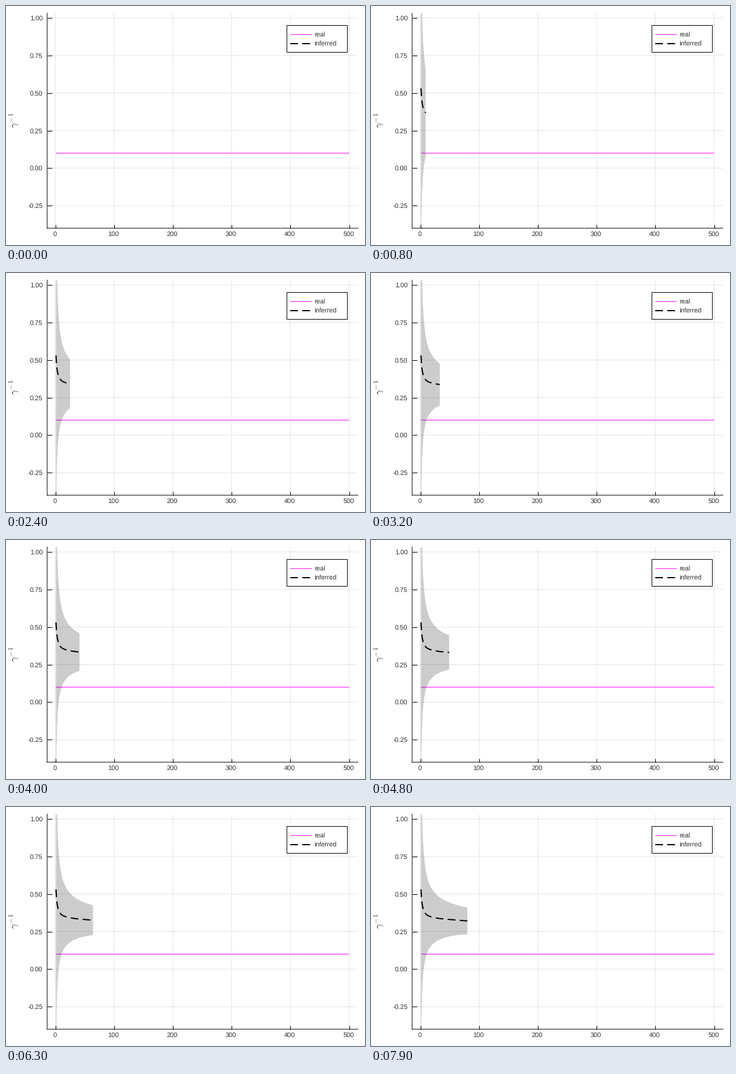
Recreate the animation shown at these times as a matplotlib script. Size 600 by 400 pixels, loop 8 s.

```python
import numpy as np
import matplotlib.pyplot as plt
from matplotlib.animation import FuncAnimation
from matplotlib.patches import Polygon, Rectangle

W, H, DPI = 600, 400, 100
FRAMES, INTERVAL = 80, 100
LEFT, RIGHT, TOP, BOTTOM = 68.8, 588.2, 11.8, 371.9
XLIM, YLIM = (-13.97, 514.97), (-0.3998, 1.0325)
PT = 72 / DPI  # points per pixel
INK = "#2e2e2e"
DASH = (0, (13 / 2, 7.2 / 2))

plt.rcParams.update({
    "font.family": "Liberation Sans",
    "font.size": 11 * PT,
    "mathtext.fontset": "cm",
    "text.hinting": "none",
    "path.snap": False,
})


def posterior(n):
    """Mean and half-width of the credible band after n observations."""
    knots = [1, 2, 3, 5, 9, 13, 17, 33, 49, 64, 80]
    means = [.531, .471, .434, .398, .368, .356, .350, .337, .331, .326, .321]
    mean = np.interp(np.log(n), np.log(knots), means)
    half = (0.775 + 0.65 / n**0.86) / np.sqrt(n)
    return mean, half


def to_px(v, lim, start, end):
    return start + (v - lim[0]) / (lim[1] - lim[0]) * (end - start)


steps = np.arange(1, FRAMES + 1)
mean, half = posterior(steps)

fig = plt.figure(figsize=(W / DPI, H / DPI), dpi=DPI, facecolor="white")
ax = fig.add_axes([LEFT / W, 1 - BOTTOM / H, (RIGHT - LEFT) / W, (BOTTOM - TOP) / H],
                  xlim=XLIM, ylim=YLIM)
ax.set_axisbelow(True)

xticks = np.arange(0, 501, 100)
yticks = np.arange(-0.25, 1.01, 0.25)
ax.set_xticks(xticks)
ax.set_yticks(yticks)
ax.tick_params(direction="in", width=PT, labelleft=False, labelbottom=False)
ax.tick_params(axis="x", length=6 * PT)
ax.tick_params(axis="y", length=7.5 * PT)
ax.grid(color="#e5e5e5", linewidth=PT)
for side, spine in ax.spines.items():
    spine.set_linewidth(PT)
    spine.set_visible(side in ("left", "bottom"))

real_style = dict(color="#ff00ff", lw=PT, solid_capstyle="butt")
dash_style = dict(color="black", lw=2 * PT, ls=DASH, dash_capstyle="butt")

ax.plot([1, 500], [0.1, 0.1], zorder=2, **real_style)
band = ax.add_patch(Polygon([(1, 0), (1, 0)], fc="black", alpha=0.2, lw=0, zorder=3))
inferred, = ax.plot([], [], zorder=4, **dash_style)

# Pixel-space layer for all text and the legend
page = fig.add_axes([0, 0, 1, 1], xlim=(0, W), ylim=(H, 0))
page.axis("off")


def label(x, y, text, ha="left"):
    page.text(x, y, text, color=INK, ha=ha, va="baseline")


for v in xticks:
    label(to_px(v, XLIM, LEFT, RIGHT) - 1, 385, f"{v}", "center")
for v in yticks:
    label(61.3, to_px(v, YLIM, BOTTOM, TOP) + 4, f"{v:.2f}", "right")
page.text(13.5, 191, r"$\gamma^{-\,1}$", rotation=90, ha="center", va="center",
          fontsize=16 * PT, color=INK)

page.add_patch(Rectangle((469.5, 32.5), 101, 45, fc="white", ec="black", lw=PT))
for y, name, style in ((47.75, "real", real_style), (63, "inferred", dash_style)):
    page.plot([475, 511], [y, y], **style)
    label(515.3, y + 4, name)


def update(frame):
    n = frame + 1
    x, m, s = steps[:n], mean[:n], half[:n]
    upper = np.column_stack([x, m + s])
    lower = np.column_stack([x, m - s])
    band.set_xy(np.vstack([upper, lower[::-1]]))
    inferred.set_data(x, m)
    return band, inferred


anim = FuncAnimation(fig, update, frames=FRAMES, interval=INTERVAL,
                     repeat=True, repeat_delay=0, blit=False)
plt.show()
```
